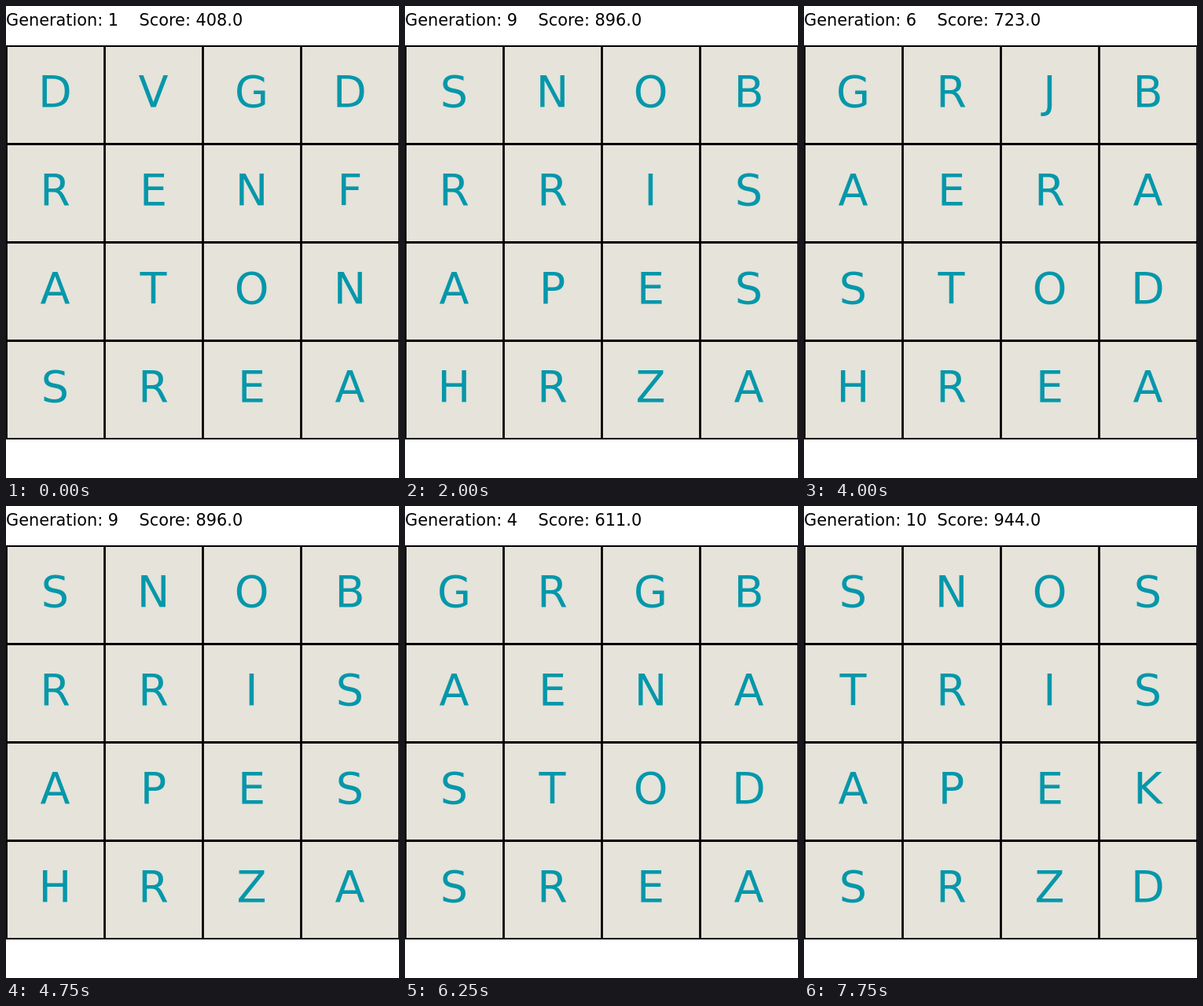
Recreate the animation shown at these times as an HTML page with a canvas. Size 500 by 600 pixels, loop 8000 ms.

```html
<!DOCTYPE html>
<html lang="en">
<head>
<meta charset="utf-8">
<title>Letter grid evolution</title>
<style>
  html, body { margin: 0; width: 100%; height: 100%; overflow: hidden; background: #fff; }
  canvas { display: block; }
</style>
</head>
<body>
<canvas id="stage" width="500" height="600"></canvas>
<script>
const ctx = document.getElementById("stage").getContext("2d", { alpha: false });
const LOOP = 8000, STEP = 250;
const CELL = 125, TOP = 50, SIZE = 500;
const FAMILY = '"DejaVu Sans", sans-serif';

// One entry per generation: score, then the four rows of the board.
const generations = [
  [408, "DVGD RENF ATON SREA"],
  [479, "DVGD RENA ATOD SREA"],
  [548, "DRGB RENA ATOD SREA"],
  [611, "GRGB AENA STOD SREA"],
  [667, "GRJB AENA STOD SREA"],
  [723, "GRJB AERA STOD HREA"],
  [782, "GRJB AERA STOK HREA"],
  [839, "GNOB AERS APEK HREA"],
  [896, "SNOB RRIS APES HRZA"],
  [944, "SNOS TRIS APEK SRZD"],
  [963, "SNOS TRIS APED WRZD"]
];

function text(value, x, y, size, color, align) {
  ctx.font = `${size}px ${FAMILY}`;
  ctx.fillStyle = color;
  ctx.textAlign = align;
  ctx.fillText(value, x, y);
}

function drawGrid() {
  ctx.save();
  ctx.beginPath();
  ctx.rect(0, TOP, SIZE, SIZE + 1);
  ctx.clip();
  ctx.fillStyle = "#e5e3da";
  ctx.fillRect(0, TOP, SIZE, SIZE);
  ctx.beginPath();
  for (let i = 0; i <= 4; i++) {
    const p = i * CELL + 0.5;
    ctx.moveTo(p, TOP);
    ctx.lineTo(p, TOP + SIZE + 1);
    ctx.moveTo(0, TOP + p);
    ctx.lineTo(SIZE, TOP + p);
  }
  ctx.strokeStyle = "#000";
  ctx.lineWidth = 2.78;
  ctx.stroke();
  ctx.restore();
}

function draw(index) {
  const [score, board] = generations[index];
  ctx.fillStyle = "#fff";
  ctx.fillRect(0, 0, 500, 600);
  drawGrid();
  const label = String(index + 1);
  const gap = " ".repeat(label.length > 1 ? 2 : 4);
  text(`Generation: ${label}${gap}Score: ${score}.0`, 0, 25, 20.83, "#000", "left");
  board.split(" ").forEach((row, r) => {
    [...row].forEach((letter, c) => {
      text(letter, (c + 0.5) * CELL, TOP + r * CELL + 78, 55.56, "#0597aa", "center");
    });
  });
}

const start = performance.now();
function tick() {
  const time = (performance.now() - start) % LOOP;
  draw(Math.floor(time / STEP) % generations.length);
  requestAnimationFrame(tick);
}
tick();
</script>
</body>
</html>
```
